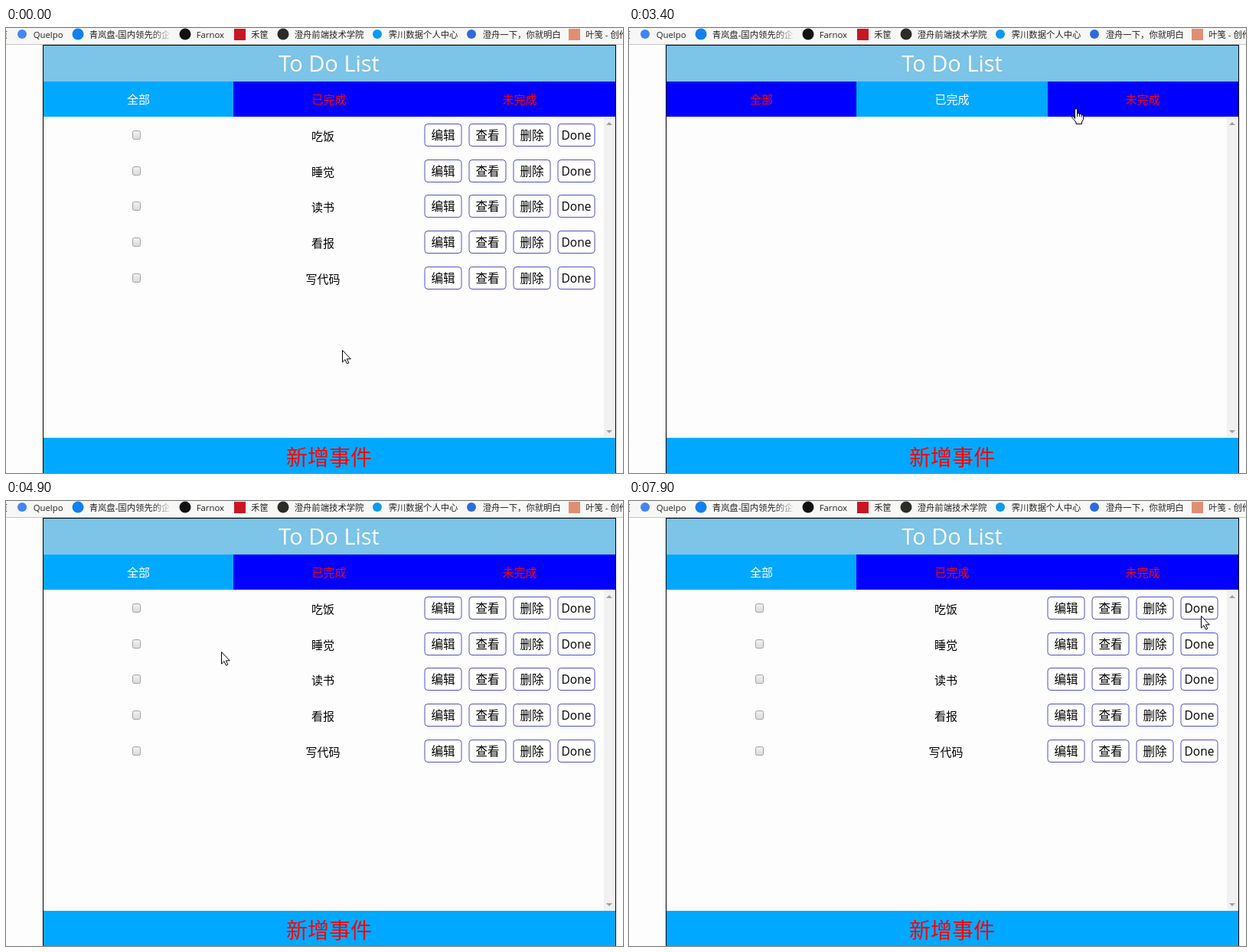
These frames come from a looping animation (806 by 582 pixels, 8 s). An HTML page:

```html
<!DOCTYPE html>
<html lang="zh-CN">
<head>
<meta charset="utf-8">
<title>To Do List</title>
<style>
html, body { margin: 0; width: 100%; height: 100%; overflow: hidden; background: #fdfdfd; }
svg { display: block; }
text { font-family: "Open Sans", "Noto Sans CJK SC", "Noto Sans CJK", sans-serif; }
</style>
</head>
<body>
<svg id="stage" width="806" height="582" viewBox="0 0 806 582">
  <defs>
    <linearGradient id="box" x2="0" y2="1">
      <stop stop-color="#f2f2f2"/><stop offset="1" stop-color="#dadada"/>
    </linearGradient>
    <linearGradient id="fade" gradientUnits="userSpaceOnUse" x1="190" x2="215" y1="0" y2="0">
      <stop stop-color="#222"/><stop offset="1" stop-color="#222" stop-opacity=".1"/>
    </linearGradient>
    <clipPath id="cut"><rect x="100" width="114" height="21"/></clipPath>
  </defs>
  <rect width="806" height="582" fill="#fdfdfd"/>
  <g id="bar"></g>
  <g id="panel"></g>
  <g id="tabs"></g>
  <g id="list"></g>
  <g id="cursor" stroke="#000" fill="#fff" stroke-linejoin="round">
    <path id="arrow" d="M.5 .5V16L4 12.7L6.5 18L8.8 17L6.4 11.8H11.3Z"/>
    <g id="hand" transform="translate(-6)">
      <path d="M4.5 13.5V2Q4.5 .5 6 .5T7.5 2V7Q9.8 5.6 10.4 7.6Q12.4 6.6 13 8.6Q15.5 8 15.5 10.5V14.5L13.5 18V20.5H6V18L1.2 12.6Q.2 10.6 1.8 10.2Q3 10.2 4.5 13.5Z"/>
      <path d="M7.5 7V11M10.4 7.6V11M13 8.6V11.5" fill="none"/>
    </g>
  </g>
</svg>
<script>
const NS = 'http://www.w3.org/2000/svg';
const $ = id => document.getElementById(id);

function add(parent, tag, attrs, content) {
  const el = document.createElementNS(NS, tag);
  for (const k in attrs) el.setAttribute(k, attrs[k]);
  if (content) el.textContent = content;
  parent.appendChild(el);
  return el;
}
const rect = (p, x, y, width, height, fill, more) =>
  add(p, 'rect', { x, y, width, height, fill, ...more });
const label = (p, str, x, y, size, fill, more) =>
  add(p, 'text', { x, y, 'font-size': size, fill, 'text-anchor': 'middle', ...more }, str);

// Bookmarks: icon centre, icon colour, square icon?, text
const bookmarks = [
  [21, '#4285f4', 0, 'Quelpo'],
  [94, '#1280ee', 0, '青岚盘-国内领先的企'],
  [234, '#111', 0, 'Farnox'],
  [305.5, '#c81623', 1, '禾筐'],
  [362, '#2b2b28', 0, '澄舟前端技术学院'],
  [485, '#0a9bf0', 0, '霁川数据个人中心'],
  [608, '#2f6be0', 0, '澄舟一下，你就明白'],
  [742.5, '#df8f74', 1, '叶笺 - 创作'],
];
const bar = $('bar');
rect(bar, 0, 0, 806, 21, '#f7f7f6');
rect(bar, 0, 21, 806, 1, '#c6c6c6');
label(bar, '页', 2, 13, 11.35, '#222', { 'text-anchor': 'end' });
bookmarks.forEach(([x, color, square, name], i) => {
  if (square) rect(bar, x - 7.5, 1, 15, 15, color);
  else add(bar, 'circle', { cx: x, cy: 8, r: i === 0 || i > 4 ? 6 : 7.5, fill: color });
  const more = { 'text-anchor': 'start' };
  if (i === 1) more['clip-path'] = 'url(#cut)';
  label(bar, name, x + 14.7, 13, 11.35, i === 1 ? 'url(#fade)' : '#222', more);
});

const panel = $('panel');
rect(panel, 48.5, 22.5, 748, 580, 'none', { stroke: '#000' });
rect(panel, 49, 23, 747, 47, '#7cc4e8');
label(panel, 'To Do List', 422, 57, 29, '#fff');
rect(panel, 781, 117, 15, 419, '#f1f1f1');
add(panel, 'path', { d: 'M784 127l4 -4l4 4zM784 526l4 4l4 -4z', fill: '#a0a0a0' });
rect(panel, 49, 536, 747, 46, '#00a8ff');
label(panel, '新增事件', 422, 571.5, 28, '#f00');

const edges = [49, 297, 547, 796];
const tabs = ['全部', '已完成', '未完成'].map((name, i) => ({
  back: rect($('tabs'), edges[i], 70, edges[i + 1] - edges[i], 46, '#00f'),
  text: label($('tabs'), name, [173, 422, 671][i], 99, 15, '#f00'),
}));

const list = $('list');
['吃饭', '睡觉', '读书', '看报', '写代码'].forEach((name, i) => {
  const top = Math.round(125 + 46.7 * i);
  rect(list, 165.5, top + 9.5, 10, 11, 'url(#box)', { rx: 2, stroke: '#a2a2a2' });
  label(list, name, 414, top + 22, 15, '#000');
  ['编辑', '查看', '删除', 'Done'].forEach((word, j) => {
    const x = 547 + 58 * j;
    rect(list, x, top + .5, 48, 29, '#fff', { rx: 4, stroke: '#5050c4' });
    label(list, word, x + 24, top + 21, 15.5, '#000');
  });
});

// Pointer path: time, x, y
const path = [
  [0, 439, 421], [1300, 439, 421], [1600, 458, 408], [2700, 458, 408],
  [2800, 430, 215], [3000, 424, 100], [3200, 426, 97], [3400, 584, 105],
  [3600, 668, 98], [3700, 669, 97], [3900, 698, 300], [4200, 282, 226],
  [4300, 257, 225], [4500, 161, 87], [4700, 163, 88], [5200, 499, 397],
  [6900, 499, 397], [7800, 745, 142], [7900, 747, 150], [8000, 747, 150],
];
// Selected tab: start time, index
const picks = [[0, 0], [3100, 1], [3700, 2], [4600, 0]];

function pointer(t) {
  const n = path.findIndex(k => k[0] > t);
  const [t0, x0, y0] = path[n - 1], [t1, x1, y1] = path[n];
  const u = (t - t0) / (t1 - t0), e = u * u * (3 - 2 * u);
  return [Math.round(x0 + (x1 - x0) * e), Math.round(y0 + (y1 - y0) * e)];
}

function draw(ms) {
  const t = Math.floor(ms % 8000 / 100) * 100;
  const active = picks.filter(p => p[0] <= t).pop()[1];
  tabs.forEach(({ back, text }, i) => {
    back.setAttribute('fill', i === active ? '#00a8ff' : '#00f');
    text.setAttribute('fill', i === active ? '#fff' : '#f00');
  });
  list.setAttribute('visibility', active === 1 ? 'hidden' : 'visible');
  const [x, y] = pointer(t);
  const overTab = y >= 70 && y < 116;
  $('cursor').setAttribute('transform', `translate(${x} ${y})`);
  $('arrow').setAttribute('visibility', overTab ? 'hidden' : 'visible');
  $('hand').setAttribute('visibility', overTab ? 'visible' : 'hidden');
}

const start = performance.now();
function tick() {
  draw(performance.now() - start);
  requestAnimationFrame(tick);
}
tick();
</script>
</body>
</html>
```
